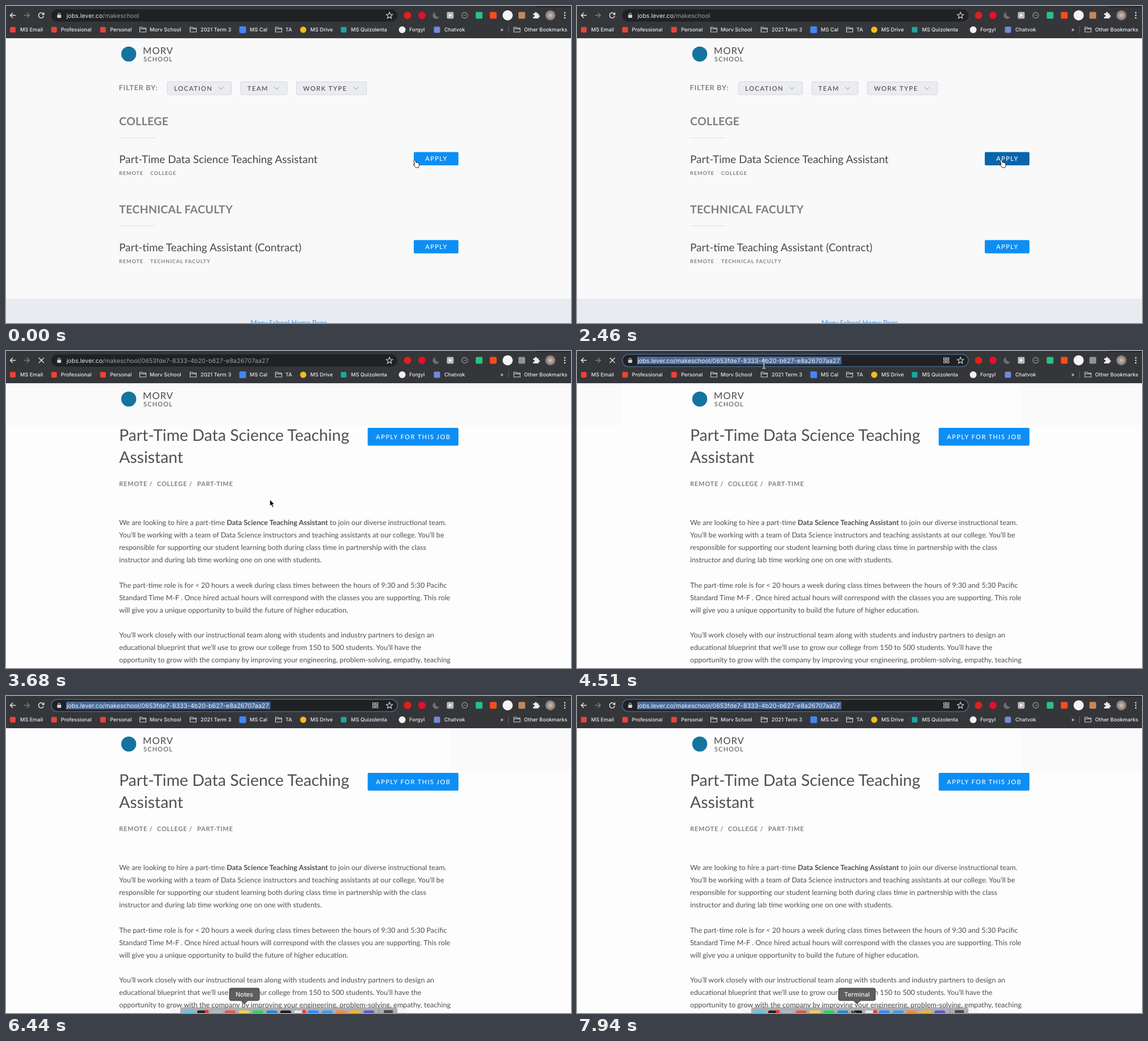
Recreate the animation shown at these times as an HTML page. Size 999 by 561 pixels, loop 8000 ms.

```html
<!DOCTYPE html>
<html lang="en">
<head>
<meta charset="utf-8">
<title>Job board</title>
<style>
html, body { margin: 0; width: 100%; height: 100%; overflow: hidden; background: #fafafa; }
svg { display: block; width: 999px; height: 561px; }
text { white-space: pre; font-family: Lato, sans-serif; text-rendering: geometricPrecision; }
.bar { font: 500 9.2px Inter, sans-serif; fill: #e8eaed; }
.url { font: 10.7px Inter, sans-serif; fill: #9aa0a6; }
.url .host { fill: #e8eaed; }
#jobId { letter-spacing: .1px; }
.selected .url, .selected .host { fill: #eef2f8; }
.filter { font-size: 11.2px; font-weight: 500; letter-spacing: 1.5px; fill: #4a4a4e; }
.label { font-size: 12.6px; font-weight: 700; letter-spacing: .8px; fill: #838383; }
.section { font-size: 19.6px; font-weight: 700; letter-spacing: .28px; fill: #7e7e7e; }
.job { font-size: 18.97px; fill: #484848; }
.tag { font-size: 9px; font-weight: 700; letter-spacing: .98px; fill: #808080; }
.path { font-size: 11.1px; font-weight: 700; letter-spacing: .72px; fill: #808080; }
.button { font-size: 11.1px; font-weight: 500; letter-spacing: 1.4px; fill: #fff; text-anchor: middle; }
.head { font-size: 28.45px; fill: #505050; }
.body { font-size: 12.63px; fill: #505054; }
.link { font-size: 12.5px; fill: #3d8fe0; text-anchor: middle; }
.tip { font: 500 11px Inter, sans-serif; fill: #f2f2f2; text-anchor: middle; }
</style>
</head>
<body>
<svg id="stage" viewBox="0 0 999 561">
  <defs>
    <radialGradient id="photo">
      <stop stop-color="#d9c3b4"/><stop offset="1" stop-color="#77706f"/>
    </radialGradient>
  </defs>
  <g id="list"></g>
  <g id="posting"></g>
  <g id="chrome"></g>
  <g id="dock"></g>
  <g id="pointer">
    <path id="hand" d="M0 0q1.5-1 2 .8l.9 3.4q1-.8 1.8.1q1-.6 1.8.3q1.3-.4 1.7 1l.3 4l-1.2 3.4h-4.7l-4-4.4q-.7-1.8 1-1.3l1 .9l-1.6-6.8q-.1-1 1-1.4z" fill="#fff" stroke="#111" stroke-width=".9"/>
    <path id="arrow" d="M0 0v11.5l2.6-2.5l2 4.6l2-.9l-2-4.4h3.5z" fill="#000" stroke="#fff" stroke-width=".8"/>
    <path id="beam" d="M-3 0q3 0 3 2v11q0 2-3 2M3 0q-3 0-3 2v11q0 2 3 2M-1.5 9h3" fill="none" stroke="#ccc" stroke-width="1.2"/>
  </g>
</svg>
<script>
const $ = id => document.getElementById(id);
const text = (cls, x, y, s, extra = '') => `<text class="${cls}" x="${x}" y="${y}" ${extra}>${s}</text>`;
const rect = (x, y, w, h, fill, r = 0, extra = '') =>
  `<rect x="${x}" y="${y}" width="${w}" height="${h}" rx="${r}" fill="${fill}" ${extra}/>`;
const dot = (x, y, r, fill, extra = '') => `<circle cx="${x}" cy="${y}" r="${r}" fill="${fill}" ${extra}/>`;
const line = (d, color, width = 1.3, extra = '') =>
  `<path d="${d}" fill="none" stroke="${color}" stroke-width="${width}" ${extra}/>`;
const square = (x, y, s, fill) => rect(x - s / 2, y - s / 2, s, s, fill, 2);

const logo = dot(217, 85, 13.3, '#14749f') +
  text('', 242, 84.5, 'MORV', 'font-size="16.6" letter-spacing="1" fill="#4a4a4a"') +
  text('', 243, 97.5, 'SCHOOL', 'font-size="11" letter-spacing="1.2" fill="#4a4a4a"');

const button = (x, y, w, h, label, id = '') =>
  rect(x, y, w, h, '#0d8ef5', 2, id && `id="${id}"`) + text('button', x + w / 2 + .5, y + h / 2 + 4, label);
const filter = (x, w, label) => rect(x + .5, 134, w, 23, '#ebecf0', 2, 'stroke="#d6d8df"') +
  text('filter', x + 12.3, 149.5, label) + line(`M${x + w - 22} 143.5l4 4l4-4`, '#8b8d95', 1);
const opening = (y, team, title, id) => text('section', 200, y, team) + rect(200, y + 22, 63, 1, '#dedede') +
  text('job', 200, y + 67, title, `id="${id}"`) +
  text('tag', 200, y + 88, 'REMOTE') + text('tag', 255, y + 88, team) +
  button(721, y + 47.5, 79, 23.5, 'APPLY', id + 'Apply');

$('list').innerHTML = rect(0, 57, 999, 504, '#f9f9f9') + logo + text('label', 199.5, 148.5, 'FILTER BY:') +
  filter(285, 113, 'LOCATION') + filter(414.5, 82, 'TEAM') + filter(513, 124, 'WORK TYPE') +
  opening(211, 'COLLEGE', 'Part-Time Data Science Teaching Assistant', 'first') +
  opening(366.7, 'TECHNICAL FACULTY', 'Part-time Teaching Assistant (Contract)', 'second') +
  rect(0, 518, 999, 43, '#e9ebf0') + text('link', 500, 565, 'Morv School Home Page');

const paragraphs = [
  'We are looking to hire a part-time <tspan font-weight="700">Data Science Teaching Assistant</tspan> to join our diverse instructional team.',
  'You’ll be working with a team of Data Science instructors and teaching assistants at our college. You’ll be',
  'responsible for supporting our student learning both during class time in partnership with the class',
  'instructor and during lab time working one on one with students.',
  '',
  'The part-time role is for &lt; 20 hours a week during class times between the hours of 9:30 and 5:30 Pacific',
  'Standard Time M-F . Once hired actual hours will correspond with the classes you are supporting. This role',
  'will give you a unique opportunity to build the future of higher education.',
  '',
  'You’ll work closely with our instructional team along with students and industry partners to design an',
  'educational blueprint that we’ll use to grow our college from 150 to 500 students. You’ll have the',
  'opportunity to grow with the company by improving your engineering, problem-solving, empathy, teaching'
];
$('posting').innerHTML = rect(0, 57, 999, 504, '#fdfdfd') +
  rect(0, 57, 999, 75, '#fafafa', 0, 'id="headAll"') + rect(0, 57, 79, 75, '#fafafa', 0, 'id="headLeft"') +
  rect(785, 57, 214, 75, '#fafafa') + logo +
  text('head', 200, 159, 'Part-Time Data Science Teaching') + text('head', 200, 198, 'Assistant') +
  button(639.5, 136, 160.5, 31.5, 'APPLY FOR THIS JOB') +
  text('path', 200, 238.5, 'REMOTE /') + text('path', 267, 238.5, 'COLLEGE /') + text('path', 338, 238.5, 'PART-TIME') +
  paragraphs.map((s, i) => text('body', 200, 308 + i * 22.12, s)).join('');

const folder = x => line(`M${x - 5} 37.5h4l1.5 1.5h5.5v7h-11zM${x - 5} 40.5h11`, '#d0d2d6', 1.1);
const bookmarks = [
  [25, 'MS Email'], [97, 'Professional'], [184, 'Personal'], [254, 'Morv School'], [344, '2021 Term 3'],
  [431, 'MS Cal'], [494, 'TA'], [538, 'MS Drive'], [610, 'MS Quizolenta'], [713, 'Forgyl'], [775, 'Chatvok'],
  [916, 'Other Bookmarks']
];
$('chrome').innerHTML = rect(0, 0, 999, 57, '#35363a') + rect(938, 0, 61, 2, '#242529') +
  rect(80, 6, 612, 21.5, '#202124', 10.7, 'id="omnibox" stroke-width="1.6"') +
  rect(106.5, 10, 361, 13.5, '#4b6b98', 0, 'id="selection"') +
  line('M17 16.5h-9.5m4.5-4.5l-4.5 4.5l4.5 4.5', '#e8eaed', 1.4) +
  line('M32 16.5h9.5m-4.5-4.5l4.5 4.5l-4.5 4.5', '#7d7f83', 1.4) +
  line('M66.3 14.5a4.6 4.6 0 1 0 .4 3.2M67 11.5v3.5h-3.5', '#e8eaed', 1.4, 'id="reload"') +
  line('M58 12l9 9m0-9l-9 9', '#e8eaed', 1.4, 'id="stop"') +
  rect(90.5, 15.5, 7, 5.5, '#d0d2d6', 1) + line('M92 16v-1.5a2 2 0 0 1 4 0v1.5', '#d0d2d6', 1) +
  text('url', 107, 20.5, '<tspan class="host">jobs.lever.co</tspan>/makeschool<tspan id="jobId">/0653fde7-8333-4b20-b627-e8a26707aa27</tspan>') +
  `<g id="share">${[648.5, 654].map(x => [12, 17.5].map(y => line(`M${x} ${y}h3.5v3.5h-3.5z`, '#d0d2d6', 1.2)).join('')).join('')}</g>` +
  line('M678 11l1.6 3.8l4 .3l-3.1 2.6l1 4l-3.5-2.2l-3.5 2.2l1-4l-3.1-2.6l4-.3z', '#d8dade', 1.1) +
  dot(710, 16.5, 6.5, '#e0211b') + dot(735.5, 16.5, 6.5, '#e60f2c') +
  '<path d="M759 11a6 6 0 1 0 7 8a6 6 0 0 1-7-8z" fill="#6f7074"/>' +
  square(785.5, 16.5, 12, '#b9babd') + '<path d="M783.5 13.5v6l5-3z" fill="#fff"/>' +
  dot(811, 16.5, 5, 'none', 'stroke="#8d8f93" stroke-width="1.3"') + rect(808.5, 16, 5, 1, '#8d8f93') +
  square(836.5, 16.5, 12, '#28c281') + square(861.5, 16.5, 12, '#fa4b1c') +
  dot(887, 16.5, 9, '#f4f4f4') + rect(906, 10.5, 12, 12, '#c2895c', 2, 'id="extension"') +
  '<path d="M932 13h3.2a1.8 1.8 0 1 1 3.4 0h3v3.2a1.8 1.8 0 1 1 0 3.4v2.4h-9.6v-3a1.8 1.8 0 1 0 0-3.2z" fill="#e8eaed"/>' +
  dot(962.5, 16.5, 9, 'url(#photo)') + [12, 16.5, 21].map(y => dot(988, y, 1.3, '#e8eaed')).join('') +
  [12, 85, 171.5].map(x => square(x, 42, 10, '#ea4335')).join('') + [241.5, 330.5, 481.5, 903].map(folder).join('') +
  square(418.5, 42, 12, '#4285f4') + dot(525.5, 42, 5.5, '#f4bd1b') + square(597, 42, 10, '#1aa6a0') +
  dot(700.5, 42, 6, '#f2f2f2') + square(762, 42, 11, '#7289da') +
  bookmarks.map(([x, s]) => text('bar', x, 45.2, s)).join('') + text('bar', 874, 45, '»') +
  rect(888, 36, 1, 12, '#606266');

const icons = ['#5ac8f0', '#222', '#aebccb', '#e2574c', '#f7d34a', '#1ed760', '#2489ca', '#1b1b1b',
  '#e9e9e9', '#2d8cff', '#3d9bf0', '#f58a3c', '#f5b921', '#5f58c7'];
$('dock').innerHTML = rect(290, 546, 420, 15, '#000', 6, 'opacity=".03"') +
  rect(308, 551, 384, 16, '#a6a7aa', 4, 'opacity=".88"') +
  icons.map((c, i) => rect(313.5 + i * 24.5, 556.5, 19, 8, c, 3)).join('') +
  dot(355, 559, 3.5, '#f2372f') + dot(527, 559, 3.5, '#f2372f') +
  rect(659, 553, 1, 8, '#888') + rect(668, 556, 16, 8, '#4c4a4a', 1) +
  '<g id="tooltip"><path id="bubble" fill="#5e5e60" stroke="#3c3c3e"/><text id="tipLabel" class="tip" y="531.5"></text></g>';

// Steps: [start ms, ...values]
const pointerSteps = [
  [0, 722, 273, 'hand'], [140, 732, 273, 'hand'], [380, 741, 273, 'hand'], [970, 746, 273, 'hand'],
  [1120, 753, 273, 'hand'], [1720, 749.5, 273, 'hand'], [2910, 715, 272, 'hand'], [3060, 610, 270, 'arrow'],
  [3210, 505, 266, 'arrow'], [3380, 466.5, 263, 'arrow'], [3850, 521, 130, 'arrow'], [4240, 330.5, 16, 'beam'],
  [5700, 350, 190, 'arrow'], [5850, 385, 400, 'arrow'], [6030, 402, 527, 'arrow'], [6440, 0, 0, 'none'],
  [7940, 488, 556, 'arrow']
];
const tooltipSteps = [
  [6440, 421.5, 53, 'Notes'], [6590, 446, 54, 'Music'], [6740, 495, 65, 'Terminal'],
  [7190, 544.5, 64, 'Meeting'], [7940, 495, 65, 'Terminal']
];
const at = (steps, t) => steps.findLast(s => s[0] <= t);
const show = (id, on) => $(id).style.display = on ? '' : 'none';

function draw(t) {
  show('list', t < 3680);
  show('posting', t >= 3680);
  show('headAll', t < 3850);
  show('headLeft', t < 5700);
  $('firstApply').setAttribute('fill', t < 140 ? '#0d8ef5' : t < 380 ? '#0a7ad1' : '#0665ac');
  $('first').style.fill = t >= 3210 ? '#4a98ea' : '';

  const loading = t >= 2610 && t < 4730, focused = t >= 4510;
  show('stop', loading);
  show('reload', !loading);
  show('jobId', t >= 3060);
  show('selection', focused);
  show('share', focused);
  $('chrome').classList.toggle('selected', focused);
  $('omnibox').setAttribute('stroke', focused ? '#466587' : 'none');
  $('extension').setAttribute('fill', t >= 3060 && t < 5130 ? '#929396' : '#c2895c');

  const [, x, y, shape] = at(pointerSteps, t);
  $('pointer').setAttribute('transform', `translate(${x} ${y})`);
  for (const id of ['hand', 'arrow', 'beam']) show(id, id === shape);

  const tip = at(tooltipSteps, t);
  show('dock', tip);
  if (tip) {
    const [, cx, w, label] = tip;
    $('bubble').setAttribute('d', `M${cx - w / 2 + 3} 517h${w - 6}q3 0 3 3v16q0 3-3 3h${9 - w / 2}l-6 6l-6-6h${9 - w / 2}q-3 0-3-3v-16q0-3 3-3z`);
    $('tipLabel').setAttribute('x', cx);
    $('tipLabel').textContent = label;
  }
}

function tick() {
  draw(performance.now() % 8000);
  requestAnimationFrame(tick);
}
tick();
</script>
</body>
</html>
```
